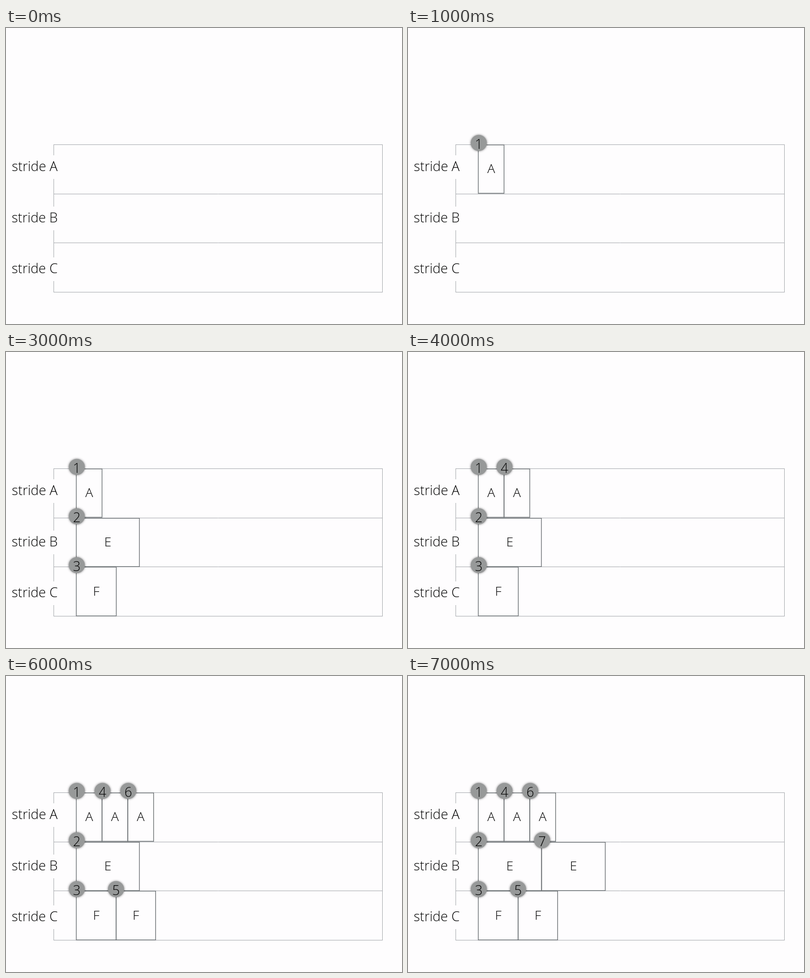
These frames come from a looping animation (800 by 600 pixels, 8000 ms). An HTML page with a canvas:

```html
<!DOCTYPE html>
<html lang="en">
<head>
<meta charset="utf-8">
<style>
html, body { margin: 0; width: 100%; height: 100%; overflow: hidden; background: #fefdfe; }
canvas { display: block; }
</style>
</head>
<body>
<canvas id="stage" width="800" height="600"></canvas>
<script>
const ctx = document.getElementById('stage').getContext('2d');
const BACKGROUND = '#fefdfe';
const STEP = 1000;
const ROW_TOPS = [236.5, 336.5, 435.5];
const LABELS = [['stride A', 290, 258], ['stride B', 394, 362], ['stride C', 496.5, 465]];

// One block appears per step: letter, row, left, right.
const BLOCKS = [
  ['A', 0, 142, 194],
  ['E', 1, 142, 269.5],
  ['F', 2, 142, 222.7],
  ['A', 0, 194, 246],
  ['F', 2, 222.3, 302.3],
  ['A', 0, 246, 298.3],
  ['E', 1, 270, 398.5],
];

function text(string, x, baseline, size = 27) {
  ctx.font = `300 ${size}px "Open Sans", "Noto Sans", sans-serif`;
  ctx.fillStyle = '#000';
  ctx.textAlign = 'center';
  ctx.fillText(string, x, baseline);
}

function drawLanes() {
  ctx.strokeStyle = '#a6a9ae';
  ctx.lineWidth = 1;
  ctx.strokeRect(96.5, 236.5, 664, 299);
  for (const y of ROW_TOPS.slice(1)) {
    ctx.beginPath();
    ctx.moveTo(96, y);
    ctx.lineTo(761, y);
    ctx.stroke();
  }
  for (const [label, baseline, gapTop] of LABELS) {
    ctx.fillStyle = BACKGROUND;
    ctx.fillRect(6, gapTop, 104, 48);
    text(label, 58, baseline);
  }
}

function drawBlock([letter, row, left, right], index) {
  const top = ROW_TOPS[row] + 0.5;
  ctx.strokeStyle = '#6c7174';
  ctx.lineWidth = 1.4;
  ctx.strokeRect(left, top, right - left, row === 2 ? 99 : 98);
  text(letter, (left + right) / 2, [294, 394, 494][row], 26);

  const x = left + (index === 4 ? 0 : 1);
  const y = top - 4;
  ctx.save();
  ctx.shadowColor = 'rgba(0, 0, 0, 0.5)';
  ctx.shadowBlur = 4;
  ctx.fillStyle = '#979999';
  ctx.beginPath();
  ctx.arc(x, y, 16.3, 0, Math.PI * 2);
  ctx.fill();
  ctx.restore();
  text(index + 1, x, y + 12);
}

function frame() {
  const visible = Math.floor(performance.now() / STEP) % (BLOCKS.length + 1);
  ctx.fillStyle = BACKGROUND;
  ctx.fillRect(0, 0, 800, 600);
  drawLanes();
  BLOCKS.slice(0, visible).forEach(drawBlock);
  requestAnimationFrame(frame);
}
frame();
</script>
</body>
</html>
```
